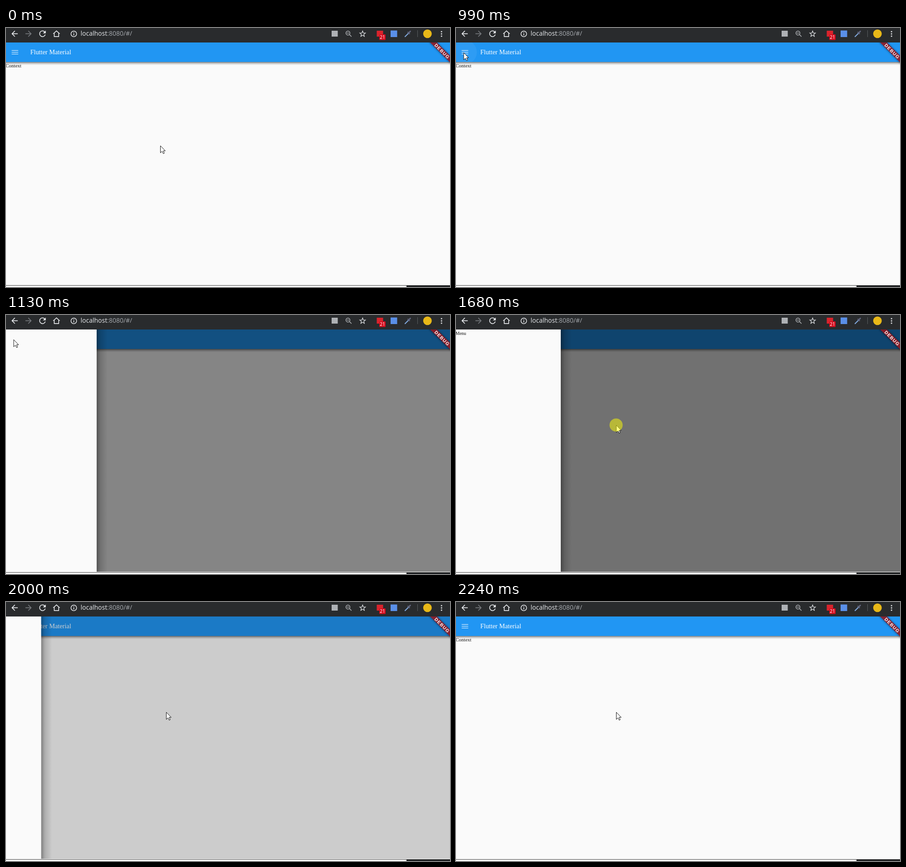
Write an HTML page that moves like this. It is 979x572 px and loops after 2.46 s.

```html
<!DOCTYPE html>
<html lang="en">
<head>
<meta charset="utf-8">
<title>Navigation drawer</title>
<style>
  html, body { margin: 0; width: 100%; height: 100%; overflow: hidden; background: #fafafa; }
  svg { display: block; }
  .serif { font-family: "Liberation Serif", serif; }
  .url { font: 14px "Open Sans", sans-serif; }
  .line { fill: none; stroke: #dfe1e4; stroke-width: 1.6; }
</style>
</head>
<body>
<svg width="979" height="572" viewBox="0 0 979 572">
  <defs>
    <linearGradient id="barShade" x2="0" y2="1">
      <stop offset="0" stop-opacity=".5"/>
      <stop offset=".45" stop-opacity=".2"/>
      <stop offset="1" stop-opacity="0"/>
    </linearGradient>
    <linearGradient id="drawerShade">
      <stop offset="0" stop-opacity=".38"/>
      <stop offset=".35" stop-opacity=".15"/>
      <stop offset="1" stop-opacity="0"/>
    </linearGradient>
    <filter id="blur" x="-20%" y="-80%" width="140%" height="260%">
      <feGaussianBlur stdDeviation="2"/>
    </filter>
    <clipPath id="page"><rect y="32" width="979" height="535"/></clipPath>
    <clipPath id="bar"><rect y="32" width="979" height="43"/></clipPath>
  </defs>

  <rect width="979" height="572" fill="#fafafa"/>

  <g clip-path="url(#page)">
    <text class="serif" x="-1" y="86.5" font-size="11" fill="#111">Context</text>
    <rect y="75" width="979" height="7" fill="url(#barShade)"/>
    <rect y="32" width="979" height="43" fill="#2196f3"/>
    <circle id="ripple" cx="19.5" cy="53.5" r="26.5" fill="#fff" opacity=".06" clip-path="url(#bar)"/>
    <path d="M12.5 49.5h14.5M12.5 53.5h14.5M12.5 57.5h14.5" stroke="#fff" stroke-width="1"/>
    <text class="serif" x="53.5" y="58" font-size="14.3" fill="#fff">Flutter Material</text>
    <rect id="scrim" y="32" width="979" height="535"/>
    <g id="drawer">
      <rect x="231" y="32" width="24" height="535" fill="url(#drawerShade)"/>
      <rect y="32" width="231" height="535" fill="#fafafa"/>
      <text class="serif" x="-1" y="43.5" font-size="10" fill="#111">Menu</text>
    </g>
    <g transform="translate(979 32) rotate(45)">
      <rect x="-34" y="20.5" width="68" height="11" opacity=".5" filter="url(#blur)"/>
      <rect x="-34" y="20.5" width="68" height="10.5" fill="#9b1c26" fill-opacity=".85"/>
      <text x="1.5" y="29.5" text-anchor="middle" font-family="Liberation Sans, sans-serif" font-size="10"
        font-weight="bold" letter-spacing="1.4" fill="#fff">DEBUG</text>
    </g>
  </g>

  <rect y="568" width="979" height="1" fill="#3a3a3a"/>
  <rect y="569" width="883" height="3" fill="#fff"/>
  <rect x="883" y="569" width="96" height="3" fill="#222426"/>

  <g id="browser">
    <rect width="979" height="32" fill="#292b2d"/>
    <g id="nav"></g>
    <circle class="line" cx="149.5" cy="13" r="6.2" stroke-width="1.4"/>
    <path d="M149.5 12v4.5M149.5 9v1.7" class="line"/>
    <text class="url" x="164.5" y="17" fill="#e8eaed">localhost<tspan fill="#a6aaaf">:8080/#/</tspan></text>
    <rect x="718" y="6" width="13.5" height="13" fill="#aeb1b5"/>
    <g class="line" style="stroke:#b4b7bb;stroke-width:1.5">
      <circle cx="754" cy="11.2" r="4.4"/>
      <path d="M757.3 14.5l4.5 4.5M751.8 11.2h4.4"/>
    </g>
    <path id="star" class="line" style="stroke-width:1.3"/>
    <rect x="817.5" y="6" width="14" height="13" fill="#d9242c"/>
    <rect x="823" y="14" width="14" height="12.5" rx="1.5" fill="#d60a1c"/>
    <text x="830" y="24" text-anchor="middle" font-family="Open Sans, sans-serif" font-size="10" fill="#fff">21</text>
    <rect x="848" y="5.5" width="14.5" height="14.5" fill="#5a8fe8"/>
    <path d="M880 19l7-7" stroke="#7fa5d8" stroke-width="2.4" stroke-linecap="round"/>
    <path d="M886.5 9.5l3 3M888 11l3.5-3.8" stroke="#60657e" stroke-width="2.8" stroke-linecap="round"/>
    <path d="M907.5 5v15" stroke="#5a5d61"/>
    <circle cx="929.3" cy="12.7" r="9.5" fill="#e8b818"/>
    <g fill="#dfe1e4">
      <circle cx="960.3" cy="8" r="1.6"/><circle cx="960.3" cy="13" r="1.6"/><circle cx="960.3" cy="18" r="1.6"/>
    </g>
  </g>

  <g id="pointer">
    <path d="M.5 .5V16.2L4.2 12.8L6.8 18L9.2 17L6.8 11.8H11.3Z" fill="#fff" stroke="#111" stroke-width="1"/>
    <circle id="click" r="14.5" fill="#ff0" opacity=".5"/>
  </g>
</svg>

<script>
const LOOP = 2460, DRAWER_WIDTH = 231, OMEGA = Math.sqrt(500);
const el = id => document.getElementById(id);

const steps = [
  [0, 340, 259.5], [70, 262, 208], [150, 105, 115], [210, 32, 80], [290, 20, 60],
  [370, 16, 50], [450, 14, 42], [530, 13, 38], [590, 14, 43.5], [670, 16.5, 54],
  [820, 16.5, 54], [990, 16.5, 54], [1050, 16.5, 54], [1130, 16.5, 54],
  [1210, 20, 58], [1290, 92, 97], [1370, 235, 163], [1450, 340, 235],
  [1530, 353, 243], [1680, 353, 243], [1910, 353, 243], [2000, 353, 243],
  [2060, 353, 243], [2150, 353, 243], [2240, 353, 243]
];

const between = (t, from, to) => t >= from && t < to;

// Remaining distance of a critically damped spring.
function settle(ms) {
  const phase = OMEGA * ms / 1000;
  return (1 + phase) * Math.exp(-phase);
}

function drawerOpening(t) {
  if (t < 1050 || t >= 2240) return 0;
  if (t < 1450) return 1 - settle(t - 973);
  return t < 1910 ? 1 : settle(t - 1898);
}

function icon(path, x, scale, fill = "#e8eaed") {
  return `<path d="${path}" fill="${fill}" transform="translate(${x} 12.7) scale(${scale}) translate(-12 -12)"/>`;
}

function drawIcons() {
  const back = "M20 11H7.8l5.6-5.6L12 4l-8 8 8 8 1.4-1.4L7.8 13H20z";
  const forward = "M4 11h12.2l-5.6-5.6L12 4l8 8-8 8-1.4-1.4 5.6-5.6H4z";
  const reload = "M17.65 6.35A8 8 0 1 0 19.73 14h-2.08A6 6 0 1 1 12 6c1.66 0 3.14.69 4.22 1.78L13 11h7V4z";
  const home = "M12 3L2 12h3v8.5h14V12h3zM12 5.7l5 4.5v8.3H7v-8.3z";
  el("nav").innerHTML = icon(back, 19, .86) + icon(forward, 49.7, .86, "#75787c") +
    icon(reload, 80.5, .9) + icon(home, 111.3, .82).replace("<path", '<path fill-rule="evenodd"');

  const corners = Array.from({ length: 10 }, (_, i) => {
    const angle = i * Math.PI / 5 - Math.PI / 2, radius = i % 2 ? 2.8 : 6.6;
    return [786.3 + radius * Math.cos(angle), 13.2 + radius * Math.sin(angle)];
  });
  el("star").setAttribute("d", `M${corners.join("L")}Z`);
}

function render(now) {
  const [t, x, y] = steps.findLast(step => step[0] <= now % LOOP);
  const open = drawerOpening(t);
  el("pointer").setAttribute("transform", `translate(${x} ${y})`);
  el("click").style.display = between(t, 820, 990) || between(t, 1680, 1910) ? "" : "none";
  el("ripple").style.display = between(t, 990, 1050) ? "" : "none";
  el("scrim").setAttribute("opacity", .544 * open);
  el("drawer").setAttribute("transform", `translate(${DRAWER_WIDTH * (open - 1)} 0)`);
  el("drawer").style.display = open ? "" : "none";
}

drawIcons();
const start = performance.now();
function tick() {
  render(performance.now() - start);
  requestAnimationFrame(tick);
}
tick();
</script>
</body>
</html>
```
